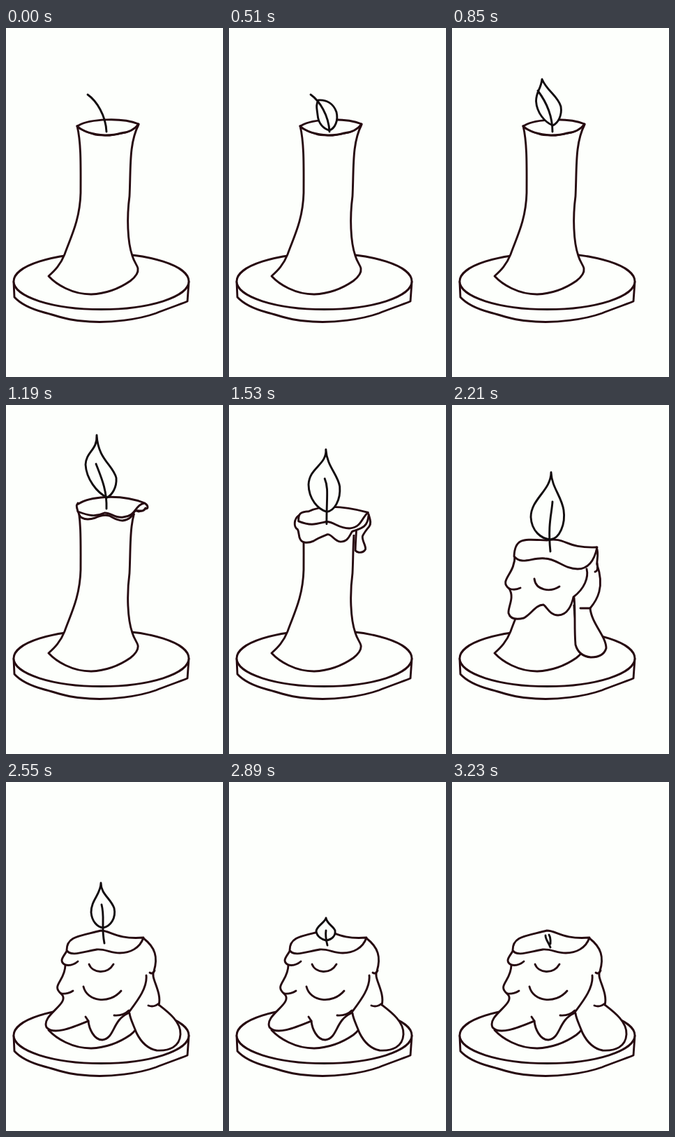
Write an HTML page that moves like this. It is 311 px wide and 498 px high and loops after 3.4 s.

```html
<!DOCTYPE html>
<html lang="en">
<head>
<meta charset="utf-8">
<title>Melting candle</title>
<style>
html, body { margin: 0; width: 100%; height: 100%; overflow: hidden; background: #fdfffc; }
svg { display: block; width: 100%; height: 100%; }
path, ellipse { fill: #fdfffc; stroke: #260a10; stroke-width: 2.9; stroke-linecap: round; stroke-linejoin: round; }
.line { fill: none; }
.dark { stroke: #120c0e; }
</style>
</head>
<body>
<svg viewBox="0 0 311 498">
  <clipPath id="below"><rect id="cut" width="311" height="498"/></clipPath>
  <path d="M11 362L12 384C22 395 40 402 55 406C75 411 90 418 120 419C150 421 190 416 215 407C230 401 245 396 260 390L262 362"/>
  <ellipse cx="136.5" cy="361.5" rx="125.5" ry="40"/>
  <path clip-path="url(#below)" d="M102 140C108 165 107 200 107 235C106 275 92 300 84 323C78 338 70 346 61 354C72 366 95 380 122 380C145 379 165 370 178 361C186 355 190 349 189 343C188 338 184 335 181 325C174 305 173 270 177 240C179 200 176 165 190 138"/>
  <path id="drip"/>
  <path id="skirt"/>
  <path id="rim"/>
  <path id="folds" class="line"/>
  <path id="flame" class="dark"/>
  <path id="wick" class="line dark"/>
</svg>
<script>
const STEP = 170, COUNT = 20;
const el = id => document.getElementById(id);

// Poses of each part; fractional positions blend two neighbours.
const rims = [
  'M102 140C102 140 102 140 104 139C120 130 165 127 190 137C184 145 175 149 165 150C156 153 150 153 142 153C125 152 112 149 102 140Z',
  'M103 152C101 144 100 142 104 141C118 132 160 125 199 140C184 142 188 158 168 160C156 162 150 153 141 154C128 160 118 158 103 152Z',
  'M95 184C97 172 103 166 128 166C155 156 165 168 200 171C199 184 193 195 182 197C160 197 152 184 138 183C120 183 118 193 95 184Z',
  'M89 216C90 188 104 192 136 193C164 188 162 205 208 203C204 222 195 234 180 234C160 234 150 219 133 219C115 217 100 229 89 216Z',
  'M87 240C87 220 105 220 136 212C150 212 158 225 197 222C192 237 178 244 163 244C150 244 142 238 130 239C112 242 92 250 87 240Z'
];
const skirts = [
  'M102 140C103 141 104 142 105 143C107 144 109 145 111 146C116 149 122 150 128 152C134 153 142 153 148 153C154 152 160 151 166 150C174 149 180 146 184 143C186 141 188 139 190 137',
  'M103 140C101 146 102 150 104 154C105 157 106 160 109 161C114 164 122 163 128 161C134 158 140 156 148 158C154 161 159 165 167 165C176 164 180 160 184 152C188 148 196 155 200 147',
  'M96 181C82 185 80 205 90 208C95 212 91 222 92 230C92 242 103 243 112 238C122 230 130 228 132 220C138 214 140 233 150 235C165 236 162 221 167 218C185 214 202 205 200 172',
  'M90 214C91 242 66 250 82 262C90 275 80 288 81 297C84 307 95 306 103 304C114 298 120 285 131 285C136 288 140 300 152 300C166 300 172 284 174 274C190 262 196 246 193 234',
  'M89 238C84 248 74 255 85 261C85 284 64 290 79 302C94 316 50 332 58 350C68 362 96 350 118 341C119 352 126 368 138 368C156 366 152 340 175 330C186 315 203 295 201 276'
];
const drips = [
  'M190 137C190 137 190 137 190 137C190 137 190 137 190 137C190 137 190 137 190 137C190 137 190 137 190 137C190 137 190 137 190 137C190 137 190 137 190 137',
  'M200 141C204 144 204 148 200 148C198 150 196 151 194 151C192 152 191 152 190 152C188 151 187 151 186 150C185 149 185 148 185 147C186 146 187 145 188 144',
  'M200 175C198 185 206 195 202 207C196 215 190 225 188 235C188 250 203 262 203 277C201 287 194 290 186 290C180 290 178 289 176 288C175 260 176 235 176 215',
  'M207 203C211 212 207 222 208 228C219 260 208 278 198 290C200 312 221 330 221 347C218 357 208 360 199 360C188 359 180 353 177 342C175 318 177 295 175 275',
  'M197 223C214 236 218 250 212 270C206 278 224 300 219 318C232 328 251 342 250 360C249 378 234 384 216 383C200 380 192 368 187 358C182 345 178 338 177 330'
];
const folds = [
  '',
  'M90 208Q97 211 101 206M138 205Q146 213 156 208M143 234C140 247 148 254 160 249',
  'M82 262Q90 265 98 261M118 248C120 264 140 268 154 259M208 226Q210 237 205 238M198 290L184 290',
  'M85 261Q95 263 103 256M79 302Q88 303 96 298M119 260C124 273 145 275 154 260M111 292C116 313 148 318 165 298M219 316Q212 322 204 319M213 269Q210 275 206 272M114 335L118 341M176 326Q168 334 155 333'
];
const flames = [
  'M131 110C127 116 127 122 128 128C130 138 138 146 144 147C152 144 157 136 155 126C150 114 142 109 131 110Z',
  'M128 103C124 110 126 115 127 124C128 137 136 144 144 146C152 143 157 132 154 120C150 108 140 102 128 103Z',
  'M130 43C131 65 115 66 114 85C115 105 130 125 145 132C152 128 159 118 158 104C153 85 132 78 130 43Z',
  'M143 73C145 95 115 100 114 127C114 148 126 160 138 162C150 162 161 145 159 122C157 105 144 92 143 73Z',
  'M142 96C142 122 113 134 113 160C114 180 128 191 141 192C154 191 163 170 160 150C157 130 143 118 142 96Z',
  'M136 144C136 160 122 168 122 186C123 199 131 207 139 208C150 206 158 194 155 180C150 166 136 160 136 144Z',
  'M139 194C138 200 125 206 125 213C126 221 134 225 139 226C147 225 153 220 152 212C150 206 140 202 139 194Z',
  'M139 207C138 210 131 214 131 219C132 227 136 230 140 231C146 230 151 226 150 219C147 214 140 211 139 207Z'
];
const wicks = [
  'M117 95C130 104 143 125 144 148',
  'M117 95C130 104 143 125 144 148',
  'M129 84C135 100 145 120 144 148',
  'M141 115C147 128 137 140 138 180',
  'M144 138C143 155 137 170 141 209',
  'M137 175C142 195 136 205 141 230',
  'M139 212C138 218 139 225 141 233',
  'M139 218C138 223 139 228 141 233',
  'M134 219C134 225 138 228 141 236M139 218C142 223 141 228 141 231'
];
const cuts = ['125', '155', '225', '285', '342'];

// Pose position of fire and wax at each step.
const fire = [0, 0, 0, 1, 1.3, 1.5, 1.8, 2, 2.22, 2.68, 2.95, 3, 3.5, 4, 4.42, 5, 5.5, 6, 7, 8];
const wax = [0, 0, 0, 0, 0, 0, 0.6, 1, 1.2, 1.43, 1.67, 2, 2.3, 3, 3.75, 4, 4, 4, 4, 4];

function blend(poses, pos) {
  const i = Math.floor(pos), w = pos - i;
  if (!w) return poses[i];
  const next = poses[i + 1].match(/\d+/g);
  let n = 0;
  return poses[i].replace(/\d+/g, v => (+v + (next[n++] - v) * w).toFixed(1));
}

function draw(step) {
  const f = fire[step], w = wax[step];
  const put = (id, d) => el(id).setAttribute('d', d);
  put('rim', blend(rims, w));
  put('skirt', blend(skirts, w));
  put('drip', blend(drips, w));
  el('drip').style.display = w ? '' : 'none';
  el('cut').setAttribute('y', blend(cuts, w));

  const fold = w < 1.6 ? 0 : w < 2.5 ? 1 : w < 3.5 ? 2 : 3;
  const drop = fold === 1 ? (w - 2) * 50 : 0;
  put('folds', folds[fold]);
  el('folds').setAttribute('transform', `translate(0 ${drop})`);

  const lit = step > 0 && step < COUNT - 1;
  put('flame', lit ? blend(flames, f) : '');
  put('wick', blend(wicks, f));
}

const start = performance.now();
let shown = -1;
function tick() {
  const step = Math.floor((performance.now() - start) / STEP) % COUNT;
  if (step !== shown) draw(shown = step);
  requestAnimationFrame(tick);
}
tick();
</script>
</body>
</html>
```
